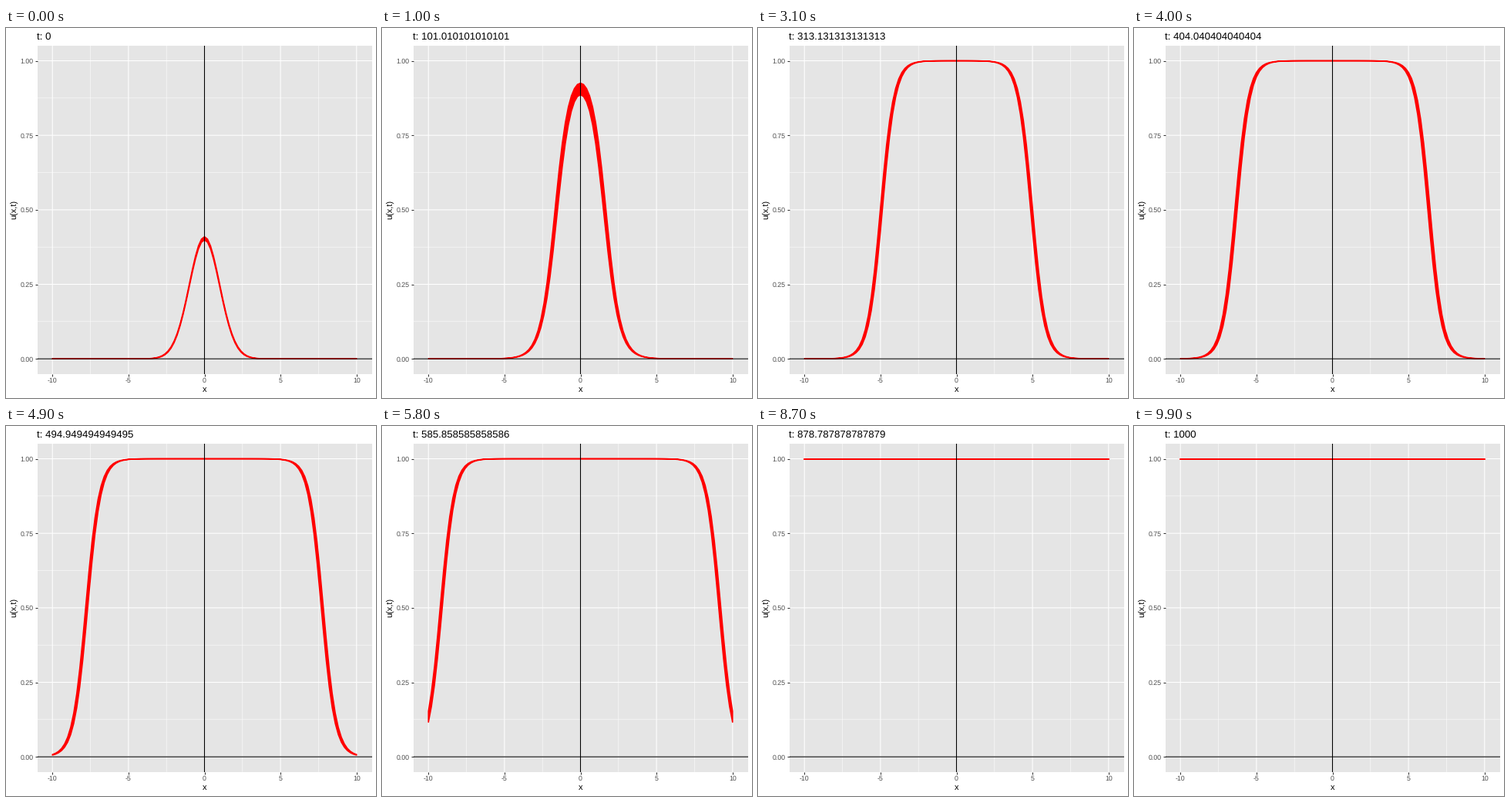
A matplotlib script for the animation above (10000 ms loop, 480 by 480 pixels).

```python
import numpy as np
import matplotlib.pyplot as plt
from matplotlib.animation import FuncAnimation
from matplotlib.patches import Polygon

SIZE, DPI = 480, 72
FRAMES, T_END = 100, 1000
LEFT, RIGHT, TOP, BOTTOM = 40.5, 474.5, 23.2, 448.5

plt.rcParams.update({
    "font.family": "Liberation Sans",
    "text.hinting": "none",
    "axes.unicode_minus": False,
})


def solve(diff=0.01, rate=0.1, a=0.15, half=11.0, dx=0.2):
    """Bistable reaction-diffusion u_t = D u_xx + r u(1-u)(u-a), zero flux."""
    n = int(round(half / dx))
    x = np.arange(-n, n + 1) * dx
    u = np.exp(-x**2 / 2) / np.sqrt(2 * np.pi)
    rows = [u]
    for _ in range(T_END):
        p = np.pad(u, 1, mode="reflect")
        lap = (p[2:] - 2 * u + p[:-2]) / dx**2
        u = u + diff * lap + rate * u * (1 - u) * (u - a)
        rows.append(u)
    shown = np.abs(x) < 10 + dx / 2
    return x[shown], np.array(rows)[:, shown]


x, u = solve()
# each frame shows every time step nearest to it
slot = np.rint(np.arange(T_END + 1) * (FRAMES - 1) / T_END).astype(int)


def band(i):
    rows = u[slot == i]
    return np.column_stack([np.r_[x, x[::-1]],
                            np.r_[rows.max(0), rows.min(0)[::-1]]])


def label(px, py, text, size, **kw):
    return fig.text(px / SIZE, 1 - py / SIZE, text, fontsize=size,
                    color="black", va="baseline", **kw)


fig = plt.figure(figsize=(SIZE / DPI, SIZE / DPI), dpi=DPI, facecolor="white")
ax = fig.add_axes([LEFT / SIZE, 1 - BOTTOM / SIZE,
                   (RIGHT - LEFT) / SIZE, (BOTTOM - TOP) / SIZE],
                  facecolor="#E5E5E5")
ax.set(xlim=(-11, 11), ylim=(-0.05, 1.05))
for spine in ax.spines.values():
    spine.set_visible(False)

xt, yt = np.arange(-10, 11, 5), np.arange(0, 1.1, 0.25)
ax.set_xticks(xt, [f"{v}" for v in xt])
ax.set_yticks(yt, [f"{v:.2f}" for v in yt])
ax.set_xticks(xt[:-1] + 2.5, minor=True)
ax.set_yticks(yt[:-1] + 0.125, minor=True)
ax.tick_params(which="major", length=2.7, width=1.07, color="#333333",
               labelcolor="#4D4D4D", labelsize=8.8)
ax.tick_params(axis="x", pad=2.2)
ax.tick_params(axis="y", pad=2.0)
ax.tick_params(which="minor", length=0)
ax.set_axisbelow(True)
ax.grid(which="major", color="white", lw=1.07, snap=False)
ax.grid(which="minor", color="white", lw=0.53, snap=False)

curve = Polygon(band(0), closed=True, fc="red", ec="red", lw=1.6,
                joinstyle="round", zorder=3)
ax.add_patch(curve)
ax.axhline(0, color="black", lw=1.07, zorder=4, snap=False)
ax.axvline(0, color="black", lw=1.07, zorder=4, snap=False)

title = label(LEFT - 0.3, 15, "", 13.2)
label(257.5, 472.5, "x", 11, ha="center")
label(14, 235.8, "u(x,t)", 11, ha="center", rotation=90,
      rotation_mode="anchor")


def draw(i):
    curve.set_xy(band(i))
    title.set_text(f"t: {i * T_END / (FRAMES - 1):.15g}")
    return curve, title


anim = FuncAnimation(fig, draw, frames=FRAMES, interval=100,
                     repeat=True, repeat_delay=0, blit=False)
plt.show()
```
